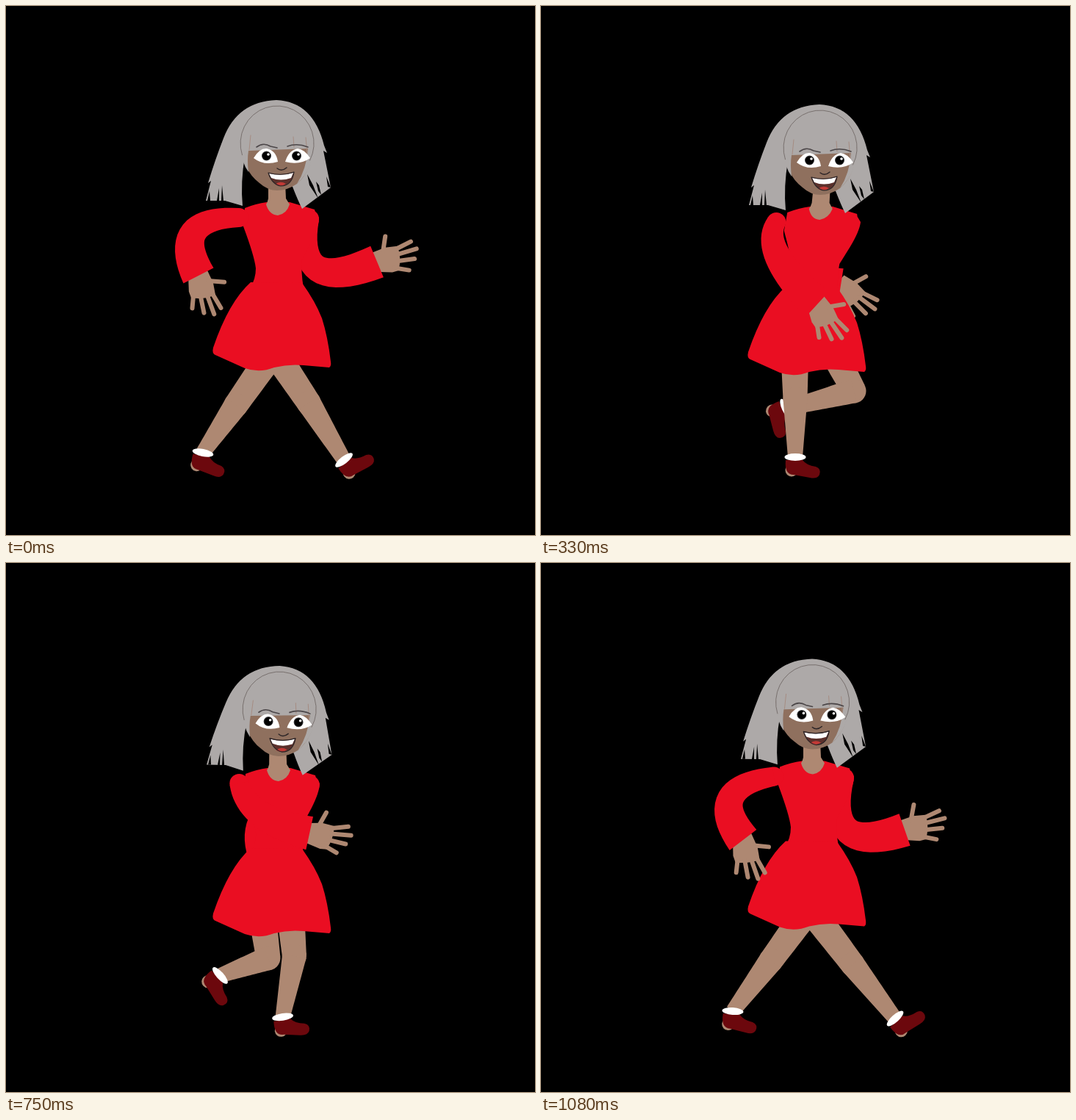
Recreate the animation shown at these times as an HTML page with a canvas. Size 720x720 px, loop 1.11 s.

```html
<!DOCTYPE html>
<html>
<head>
<meta charset="utf-8">
<style>
html, body { margin: 0; height: 100%; overflow: hidden; background: #000 }
canvas { display: block }
</style>
</head>
<body>
<canvas id="stage" width="720" height="720"></canvas>
<script>
const g = document.getElementById('stage').getContext('2d');
const LOOP = 1110, STEP = 30;
const SKIN = '#ae8872', FACE = '#8f705e', RED = '#ea0e22', HAIR = '#ada9a8', SHOE = '#6c080d', INK = '#2b2426';

// time, lean, drop, head tilt in degrees
const BODY = [
  [0, 0, 0, 0], [120, 0, 9, .3], [330, 11, 6, 0], [450, 4, 0, -.4],
  [630, 1.5, 5.5, .8], [900, 1, 16, 1.8], [1080, 0, 2.5, .4]
];
// time, knee x y, ankle x y, foot angle
const NEAR_LEG = [
  [0, 412, 540, 460, 618, -38], [120, 386, 530, 404, 617, -17], [330, 346, 535, 346, 614, 0],
  [450, 328, 530, 311, 615, 0], [630, 292, 528, 258, 590, 17], [765, 365, 538, 298, 560, 50],
  [900, 426, 527, 378, 575, 45], [1080, 424, 546, 482, 620, -42]
];
const FAR_LEG = [
  [0, 313, 543, 268, 608, 11], [120, 375, 531, 287, 566, 56], [330, 426, 524, 333, 548, 65],
  [450, 448, 507, 394, 574, 8], [555, 438, 528, 466, 617, -28], [630, 417, 535, 442, 621, -33],
  [765, 388, 535, 368, 617, -5], [900, 330, 543, 290, 606, 20], [1080, 313, 541, 261, 610, 4]
];
// time, elbow control x y, cuff x y, hand angle
const NEAR_ARM = [
  [0, 222, 288, 262, 367, 76], [120, 236, 328, 313, 384, 68], [330, 297, 333, 376, 406, 62],
  [450, 298, 374, 396, 367, 35], [630, 330, 352, 430, 331, -14], [900, 300, 344, 361, 418, 62],
  [1080, 221, 306, 275, 377, 77]
];
const FAR_ARM = [
  [0, 390, 396, 505, 348, -10], [120, 358, 390, 464, 373, 2], [330, 345, 370, 408, 380, 43],
  [450, 350, 340, 345, 385, 100], [630, 303, 315, 308, 378, 118], [765, 325, 340, 360, 402, 88],
  [900, 350, 386, 425, 425, 52], [1080, 383, 402, 495, 363, -8]
];

const shape = d => new Path2D(d);
const TORSO = shape('M325 275Q340 269 355 267L386 267 420 277 421 281 426 288Q426 300 415 322L403 345Q401 360 405 384L332 384Q340 372 340 357Q338 340 323 300Z');
const SKIRT = shape('M333 376Q303 403 282 465Q280 473 285 475L325 493Q345 500 365 492Q385 487 405 489L440 492Q443 490 442 484Q438 450 430 425Q421 402 403 377Z');
const NECK = shape('M357 240L357 262Q356 267 354 270Q358 284 370 285Q382 283 386 270L381 262 380 240Z');
const BACK_HAIR = shape('M272 265L279 238 275 241Q285 208 296 180Q315 130 368 128Q418 130 433 190L437 200 432 197 442 247 403 276Q397 264 390 246L325 205Q319 240 322 272L298 265Z');
const FACE_SHAPE = shape('M319 186Q322 224 345 241Q356 251 369 251Q383 251 396 242Q417 224 419 186Z');
const CAP = shape('M319 190A50 51 0 0 1 419 190Q418 222 396 242Q409 222 411 194L330 197Q328 210 330 226Q320 212 319 190Z');
const SLITS = shape('M410 229L413 244 425 262 418 244ZM422 239L425 252 429 257 426 244ZM436 232L438 246 442 247ZM290 248L287 265 290 265ZM294 244L293 265 296 265ZM277 252L274 265 278 265Z');
const EYES = shape('M337 207Q345 193 355 194Q368 197 370 212Q351 218 337 207ZM380 212Q385 196 397 194Q406 195 414 207Q400 217 380 212Z');
const BROWS = shape('M341 192Q350 185 360 191L369 193M383 191Q396 186 411 192');
const NOSE = shape('M369 221Q375 226 382 220');
const MOUTH = shape('M357 227Q375 232 392 226Q389 245 374 245Q362 243 357 227Z');
const TEETH = shape('M358 228Q375 232 391 227L388 234Q374 239 361 234Z');
const TONGUE = shape('M366 243Q373 237 381 242Q374 247 366 243Z');
const STRANDS = shape('M333 176L331 196M391 178L392 192M408 179L410 202');
const PALM = shape('M-6-13L14-17 31-16Q34 0 27 17L18 18-6 13Z');
const FINGERS = shape('M10-11L17-32M27-12L50-19M29-5L56-8M27 4L51 5M21 12L41 19');
const SHOE_SHAPE = shape('M-13 4L10 4Q15 11 28 13Q36 16 33 24Q30 30 20 28L-2 24Q-15 24-13 4Z');

// Smooth periodic interpolation through uneven keys
function pose(keys, t) {
  const n = keys.length;
  let i = n - 1;
  while (keys[i][0] > t) i--;
  const [a, b, c, d] = [-1, 0, 1, 2].map(o => {
    const turn = Math.floor((i + o) / n), [time, ...rest] = keys[i + o - turn * n];
    return [time + turn * LOOP, ...rest];
  });
  const slope = (p, q, r, m) => {
    const h = q[0] - p[0], k = r[0] - q[0];
    return (k * (q[m] - p[m]) / h + h * (r[m] - q[m]) / k) / (h + k);
  };
  const h = c[0] - b[0], u = (t - b[0]) / h, v = 1 - u;
  return b.slice(1).map((_, j) => {
    const m = j + 1;
    return b[m] * v * v * (1 + 2 * u) + c[m] * u * u * (3 - 2 * u)
      + h * u * v * (v * slope(a, b, c, m) - u * slope(b, c, d, m));
  });
}

function fill(path, color) { g.fillStyle = color; g.fill(path); }
function stroke(path, color, width) {
  g.strokeStyle = color;
  g.lineWidth = width;
  g.stroke(path);
}
function disc(x, y, rx, color, ry = rx) {
  g.fillStyle = color;
  g.beginPath();
  g.ellipse(x, y, rx, ry, 0, 0, 7);
  g.fill();
}
function placed(x, y, degrees, draw) {
  g.save();
  g.translate(x, y);
  g.rotate(degrees * Math.PI / 180);
  draw();
  g.restore();
}

// Band of changing half-width along a quadratic curve
function band(x0, y0, cx, cy, x1, y1, w0, w1, color) {
  const near = [], far = [];
  for (let i = 0; i <= 20; i++) {
    const u = i / 20, v = 1 - u, w = w0 + (w1 - w0) * u;
    const x = v * v * x0 + 2 * u * v * cx + u * u * x1;
    const y = v * v * y0 + 2 * u * v * cy + u * u * y1;
    const dx = v * (cx - x0) + u * (x1 - cx), dy = v * (cy - y0) + u * (y1 - cy);
    const s = w / Math.hypot(dx, dy);
    near.push([x - dy * s, y + dx * s]);
    far.unshift([x + dy * s, y - dx * s]);
  }
  g.fillStyle = color;
  g.beginPath();
  for (const p of [...near, ...far]) g.lineTo(...p);
  g.fill();
}
function bone(x0, y0, x1, y1, w0, w1) {
  band(x0, y0, (x0 + x1) / 2, (y0 + y1) / 2, x1, y1, w0, w1, SKIN);
}

function leg(keys, t, hipX, hipY) {
  const [kx, ky, ax, ay, angle] = pose(keys, t);
  bone(hipX, hipY, kx, ky, 20, 16.5);
  disc(kx, ky, 16.5, SKIN);
  bone(kx, ky, ax, ay, 16.5, 10);
  placed(ax, ay, angle, () => {
    disc(-5, 18, 8.5, SKIN);
    fill(SHOE_SHAPE, SHOE);
    disc(0, 0, 14.5, '#fff', 5);
  });
}

function arm(keys, t, x, y) {
  const [cx, cy, wx, wy, angle] = pose(keys, t);
  placed(wx, wy, angle, () => {
    fill(PALM, SKIN);
    stroke(FINGERS, SKIN, 6);
  });
  disc(x, y, 13, RED);
  band(x, y, cx, cy, wx, wy, 13, 23, RED);
}

function head() {
  fill(BACK_HAIR, HAIR);
  fill(SLITS, '#000');
}

function face() {
  fill(FACE_SHAPE, FACE);
  fill(CAP, HAIR);
  g.strokeStyle = '#6b6260';
  g.lineWidth = .8;
  g.beginPath();
  g.ellipse(369, 187, 50, 51, 0, Math.PI * .9, Math.PI * 2.15);
  g.stroke();
  stroke(STRANDS, '#a58c82', 1);
  fill(EYES, '#fff');
  for (const x of [354.5, 395.5]) {
    disc(x, 204, 6.5, '#3a3a3c');
    disc(x, 204, 5.5, '#000');
    disc(x + 2.5, 202, 1.8, '#fff');
  }
  stroke(BROWS, '#4b4648', 1.6);
  stroke(NOSE, INK, 1.4);
  fill(MOUTH, '#5b302b');
  fill(TONGUE, '#c33a36');
  fill(TEETH, '#fff');
  stroke(MOUTH, INK, 1.2);
}

function frame() {
  const t = Math.floor(performance.now() % LOOP / STEP) * STEP;
  const [lean, drop, tilt] = pose(BODY, t);
  const upper = draw => {
    g.save();
    g.transform(1, 0, -lean / 110, 1, lean * 378 / 110, drop);
    draw();
    g.restore();
  };
  const onHead = draw => placed(370 + lean, 262 + drop, tilt, () => {
    g.translate(-370, -262);
    draw();
  });
  g.fillStyle = '#000';
  g.fillRect(0, 0, 720, 720);
  g.lineCap = g.lineJoin = 'round';

  arm(FAR_ARM, t, 413 + lean * .7, 290 + drop);
  leg(FAR_LEG, t, 385, 440 + drop);
  leg(NEAR_LEG, t, 345, 440 + drop);
  upper(() => fill(TORSO, RED));
  placed(0, drop, 0, () => fill(SKIRT, RED));
  onHead(head);
  upper(() => fill(NECK, SKIN));
  onHead(face);
  arm(NEAR_ARM, t, 317 + lean * .3, 288 + drop);
  requestAnimationFrame(frame);
}
frame();
</script>
</body>
</html>
```
